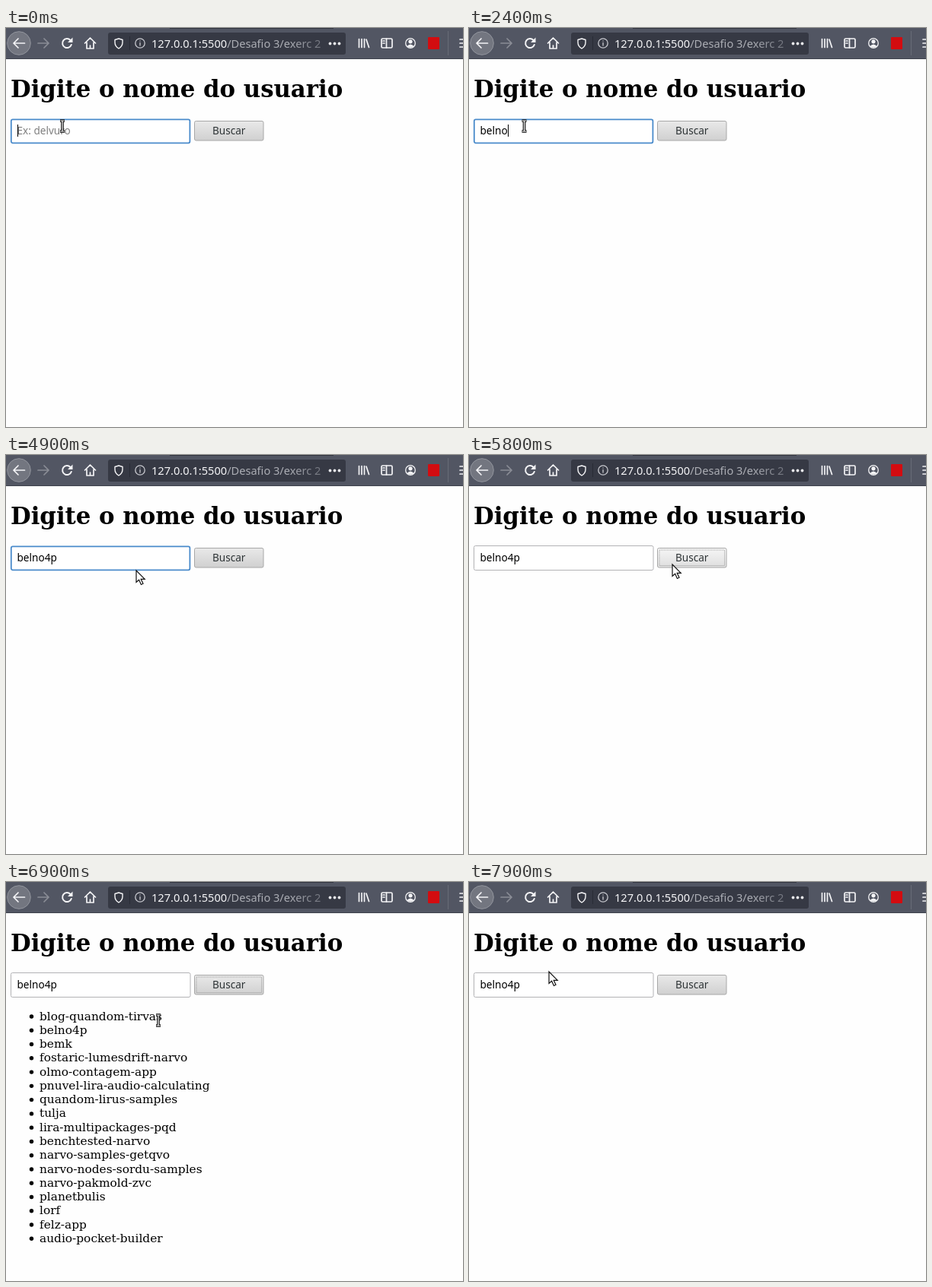
Write an HTML page that moves like this. It is 600 px wide and 525 px high and loops after 8000 ms.

```html
<!DOCTYPE html>
<html lang="pt">
<head>
<meta charset="utf-8">
<title>Busca de usuario</title>
<style>
  html, body { margin: 0; width: 100%; height: 100%; overflow: hidden; background: #fefefe; }
  svg { display: block; width: 600px; height: 525px; }
  .ui { font: 13.6px "Noto Sans", "Open Sans", sans-serif; }
  .url { font-size: 14.6px; }
  .page { font: 15.39px "DejaVu Serif", serif; }
  .title { font: bold 30.77px "DejaVu Serif", serif; }
  .icon { fill: none; stroke: #f4f4f6; stroke-width: 1.7; stroke-linecap: round; stroke-linejoin: round; }
</style>
</head>
<body>
<svg viewBox="0 0 600 525">
  <defs>
    <linearGradient id="fade" gradientUnits="userSpaceOnUse" x1="370" x2="420">
      <stop stop-color="#abadb4"/><stop offset="1" stop-color="#686b75"/>
    </linearGradient>
    <linearGradient id="plain" x2="0" y2="1">
      <stop stop-color="#e9e9e9"/><stop offset="1" stop-color="#d0d0d0"/>
    </linearGradient>
    <linearGradient id="lit" x2="0" y2="1">
      <stop stop-color="#f6f6f6"/><stop offset="1" stop-color="#dedede"/>
    </linearGradient>
  </defs>

  <!-- Toolbar -->
  <rect width="600" height="41" fill="#525663"/>
  <rect x="215" width="215" height="1" fill="#30333d"/>
  <rect y="40" width="600" height="1" fill="#3f424d"/>
  <circle cx="17" cy="20" r="15.3" fill="#737680" stroke="#92959d"/>
  <path class="icon" d="M24.5 20H10M16 14l-6 6 6 6"/>
  <path class="icon" d="M42 20H56M50 14l6 6-6 6" style="stroke:#8a8d96"/>
  <rect id="reloadHover" x="66" y="7" width="27" height="26" rx="3" fill="#7d808a"/>
  <g id="reload">
    <path class="icon" d="M84.5 16A6 6 0 1 0 85.8 22" style="stroke-width:2"/>
    <path d="M87.5 12.500v6.500h-6.500z" fill="#f4f4f6"/>
  </g>
  <path id="stop" class="icon" d="M74.500 14.500l11 11M85.500 14.500l-11 11"/>
  <path class="icon" d="M103.500 20l7-7 7 7M106 19v8h9v-8M110.500 27v-4"/>

  <rect x="134" y="6" width="312" height="29" rx="3" fill="#363944"/>
  <path class="icon" d="M148 14l5 1.500v3.500q0 5-5 8-5-3-5-8v-3.500z" style="stroke-width:1.4"/>
  <path d="M162.500 11v18" stroke="#292c35"/>
  <g class="icon" style="stroke:#c9cad0;stroke-width:1.3">
    <circle cx="176" cy="20" r="6.2"/><path d="M176 19.500v3.500M176 17v.1"/>
  </g>
  <text class="ui url" x="191" y="25.700" fill="#f5f5f7">127.0.0.1:5500<tspan fill="url(#fade)">/Desafio 3/exerc 2</tspan></text>
  <g fill="#e6e7ea">
    <circle cx="425.500" cy="20.500" r="1.900"/><circle cx="431.500" cy="20.500" r="1.900"/><circle cx="437.500" cy="20.500" r="1.900"/>
  </g>

  <path class="icon" d="M463.500 14.500v11M467 14.500v11M470.500 14.500v11M473 15l3.500 10.500"/>
  <rect class="icon" x="493" y="14" width="14" height="12" rx="1.500"/>
  <path class="icon" d="M499.500 14v12M495 17h2M495 20h2"/>
  <circle class="icon" cx="531" cy="20" r="6.300" style="stroke-width:1.3"/>
  <path d="M531 15.200a2.600 2.600 0 0 1 0 5.200 2.600 2.600 0 0 1 0-5.200M526.500 24q4.500-5 9 0-4.500 3.500-9 0" fill="#f4f4f6"/>
  <rect x="554" y="12" width="15" height="16" rx="1" fill="#d30c10"/>
  <path d="M580.500 4v32" stroke="#686b77"/>
  <path class="icon" d="M596 15h8M596 20h8M596 25h8"/>

  <!-- Page -->
  <text class="title" x="6" y="90.700">Digite o nome do usuario</text>
  <rect id="field" fill="#fff"/>
  <text id="typed" class="ui" x="14.500" y="140"></text>
  <rect id="caret" y="127" width="1" height="16"/>
  <rect id="button" x="247.500" y="122.500" width="90.500" height="25.500" rx="2" stroke="#a8a8a8"/>
  <rect id="dots" x="250" y="125" width="85.500" height="20.500" fill="none" stroke="#999" stroke-dasharray="1 1"/>
  <text class="ui" x="292.700" y="140" text-anchor="middle" fill="#2e3436">Buscar</text>
  <g id="list" class="page"></g>

  <path id="arrow" d="M0 0V15.500L3.600 12.300 6.400 18.500 9 17.300 6.200 11.300H11.200Z" fill="#fff" stroke="#111" stroke-width="1.2"/>
  <g id="beam" fill="none">
    <path d="M-3-7H3M-3 7H3M0-7V7" stroke="#111" stroke-width="3.6"/>
    <path d="M-2.600-7H2.600M-2.600 7H2.600M0-7V7" stroke="#fff" stroke-width="1.2"/>
  </g>
</svg>
<script>
const $ = id => document.getElementById(id);
const USER = 'belno4p', HINT = 'Ex: delvuro';
const LOOP = 8000, STEP = 100;
const KEYS = [1300, 1500, 1900, 2100, 2300, 3400, 4400];
const CLICK = 5400, ANSWER = 6100, RELOAD = 7500, CLEAR = 7700, LOADED = 7900;
const REPOS = `blog-quandom-tirvas ${USER} bemk fostaric-lumesdrift-narvo olmo-contagem-app
  pnuvel-lira-audio-calculating quandom-lirus-samples tulja lira-multipackages-pqd
  benchtested-narvo narvo-samples-getqvo narvo-nodes-sordu-samples narvo-pakmold-zvc
  planetbulis lorf felz-app audio-pocket-builder`.split(/\s+/);

// Pointer path: time, x, y
const PATH = [
  [0, 74, 129], [100, 72.5, 129], [4600, 72.5, 129], [4800, 138, 144], [4900, 171, 152],
  [5100, 245, 149], [5300, 267, 144], [6400, 267, 144], [6600, 247, 160], [6900, 200, 182],
  [7000, 194, 172], [7300, 98, 60], [7400, 75, 31], [7700, 75, 31], [7800, 80, 50], [7900, 105, 118]
];

$('list').innerHTML = REPOS.map((name, i) => {
  const y = 181.6 + i * 18.27;
  return `<circle cx="33.5" cy="${y - 4.6}" r="2.7"/><text x="44" y="${y}">${name}</text>`;
}).join('');

const show = (id, on) => $(id).setAttribute('visibility', on ? 'visible' : 'hidden');
const set = (id, attrs) => {
  for (const name in attrs) $(id).setAttribute(name, attrs[name]);
};
const between = (t, a, b) => t >= a && t < b;

function pointer(t) {
  const i = PATH.findIndex(p => p[0] > t);
  if (i < 0) return PATH[PATH.length - 1].slice(1);
  const [t0, x0, y0] = PATH[i - 1], [t1, x1, y1] = PATH[i];
  const k = (t - t0) / (t1 - t0);
  return [x0 + (x1 - x0) * k, y0 + (y1 - y0) * k];
}

function draw(t) {
  const [x, y] = pointer(t);
  const over = (l, top, r, b) => x >= l && x < r && y >= top && y < b;
  const listed = between(t, ANSWER, CLEAR);
  const focused = t < CLICK;

  const count = KEYS.filter(k => k <= t).length;
  $('typed').textContent = count ? USER.slice(0, count) : HINT;
  set('typed', { fill: count ? '#000' : '#808080' });
  const end = count ? $('typed').getComputedTextLength() : 0;
  set('caret', { x: Math.round(14.5 + end) });
  show('caret', t < 4700 && !between(t, 1000, 1300) && !between(t, 2900, 3400));

  set('field', focused
    ? { x: 6.8, y: 120.3, width: 234.6, height: 31, rx: 2, stroke: '#4a8bcb', 'stroke-width': 1.8 }
    : { x: 6.5, y: 119.5, width: 235.5, height: 32, rx: 2, stroke: '#b2b2b5', 'stroke-width': 1 });
  set('button', { fill: over(247, 122, 338, 148) ? 'url(#lit)' : 'url(#plain)' });
  show('dots', between(t, CLICK, CLEAR));
  show('list', listed);

  const loading = between(t, RELOAD, LOADED);
  show('reloadHover', over(66, 7, 93, 33));
  show('reload', !loading);
  show('stop', loading);

  const onText = over(6, 119, 242, 151.5) || over(6, 65, 441, 97) || listed && over(44, 168, 204, 478);
  show('beam', onText);
  show('arrow', !onText);
  set(onText ? 'beam' : 'arrow', { transform: `translate(${x} ${y})` });
}

function frame() {
  const t = performance.now() % LOOP;
  draw(Math.floor(t / STEP) * STEP);
  requestAnimationFrame(frame);
}
frame();
</script>
</body>
</html>
```
